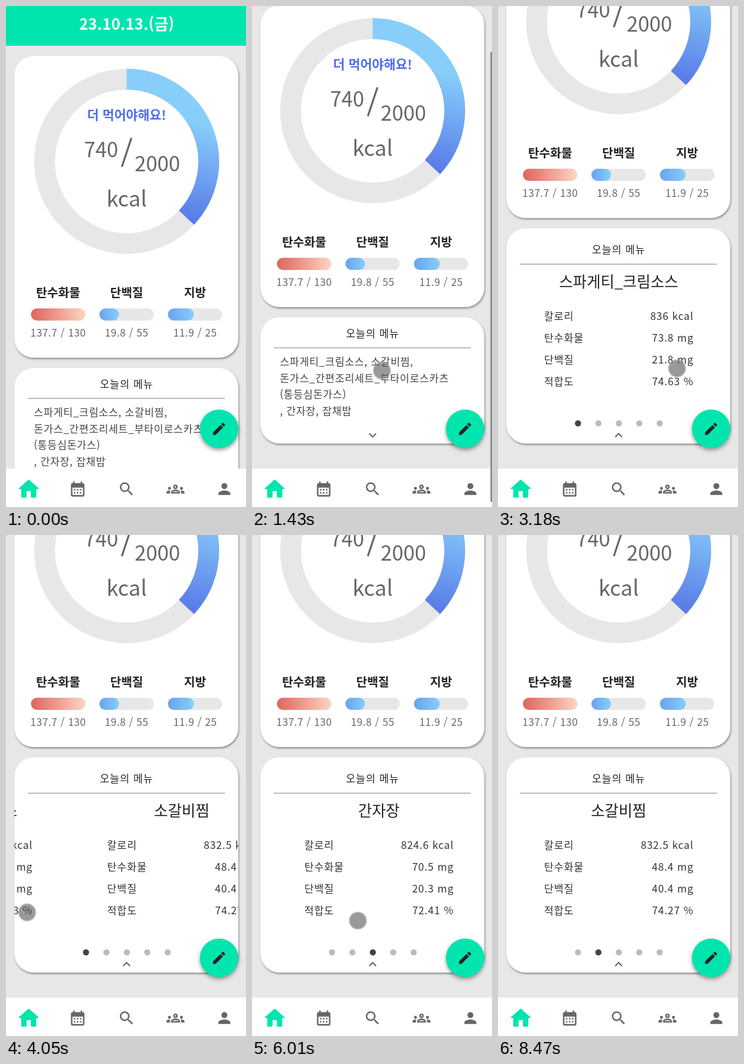
These frames come from a looping animation (375 by 782 pixels, 8.67 s). An HTML page:

```html
<!DOCTYPE html>
<html lang="ko">
<head>
<meta charset="utf-8">
<style>
html, body { margin: 0; width: 100%; height: 100%; overflow: hidden; background: #e7e7e7 }
svg { display: block; font: 300 16px "Noto Sans CJK KR", "Noto Sans CJK", sans-serif; fill: #333 }
.mid { text-anchor: middle }
.end { text-anchor: end }
.card { fill: #fff; filter: drop-shadow(1.5px 2px 1.5px #0006) }
.big { font-size: 32px; font-weight: 400; fill: #666 }
.name { font-size: 18.7px; font-weight: 600; fill: #222 }
.amount { fill: #666; letter-spacing: .45px }
.head { font-weight: 400; fill: #222; letter-spacing: .9px }
.list { fill: #444; letter-spacing: .6px }
.dish { font-size: 23.5px; fill: #222 }
.row { letter-spacing: .8px }
.icon { fill: #666 }
</style>
</head>
<body>
<svg id="stage" width="375" height="782" viewBox="0 0 375 782"></svg>
<script>
const LOOP = 8670, PITCH = 350, VIEW = 774;
const MINT = '#00e5ae';

const dishes = [
  [['스파게티_크림소스'], '836', '73.8', '21.8', '74.63'],
  [['소갈비찜'], '832.5', '48.4', '40.4', '74.27'],
  [['돈가스_간편조리세트_부타이로', '스카츠 (통등심돈가스)'], '835.8', '34.2', '46.1', '72.86'],
  [['간자장'], '824.6', '70.5', '20.3', '72.41'],
  [['잡채밥'], '818.2', '76.1', '18.7', '71.95']
];
const rowNames = ['칼로리', '탄수화물', '단백질', '적합도'];
const units = ['kcal', 'mg', 'mg', '%'];

const icons = {
  home: 'M10 19v-5h4v5c0 .55.45 1 1 1h3c.55 0 1-.45 1-1v-7h1.7c.46 0 .68-.57.33-.87L12.67 3.6c-.38-.34-.96-.34-1.34 0l-8.36 7.53c-.34.3-.13.87.33.87H5v7c0 .55.45 1 1 1h3c.55 0 1-.45 1-1z',
  calendar: 'M19 4h-1V2h-2v2H8V2H6v2H5c-1.1 0-2 .9-2 2v14c0 1.1.9 2 2 2h14c1.1 0 2-.9 2-2V6c0-1.1-.9-2-2-2zm0 16H5V10h14v10zM9 14H7v-2h2v2zm4 0h-2v-2h2v2zm4 0h-2v-2h2v2zm-8 4H7v-2h2v2zm4 0h-2v-2h2v2zm4 0h-2v-2h2v2z',
  search: 'M15.5 14h-.79l-.28-.27A6.5 6.5 0 1 0 13.73 14.43l.27.28v.79l5 4.99L20.49 19l-4.99-5zm-6 0a4.5 4.5 0 1 1 0-9 4.5 4.5 0 0 1 0 9z',
  groups: 'M4 13a2 2 0 1 0 0-4 2 2 0 0 0 0 4zm1.13 1.1a7 7 0 0 0-3.91.48A2 2 0 0 0 0 16.43V18h4.5v-1.61c0-.83.23-1.61.63-2.29zM20 13a2 2 0 1 0 0-4 2 2 0 0 0 0 4zm4 3.43a2 2 0 0 0-1.22-1.85 7 7 0 0 0-3.91-.48c.4.68.63 1.46.63 2.29V18H24zm-7.76-2.78a10.400 10.400 0 0 0-8.480 0A3 3 0 0 0 6 16.390V18h12v-1.610a3 3 0 0 0-1.760-2.740zM8.070 16c.09-.23.13-.39.91-.69a8.300 8.300 0 0 1 6.040 0c.77.3.81.46.91.69zM12 8a1 1 0 1 1 0 2 1 1 0 0 1 0-2m0-2a3 3 0 1 0 0 6 3 3 0 0 0 0-6z',
  person: 'M12 12a4 4 0 1 0 0-8 4 4 0 0 0 0 8zm0 2c-2.67 0-8 1.340-8 4v2h16v-2c0-2.660-5.330-4-8-4z',
  pencil: 'M3 17.25V21h3.75L17.81 9.94l-3.75-3.75L3 17.25zM20.710 7.040a1 1 0 0 0 0-1.410l-2.340-2.340a1 1 0 0 0-1.410 0l-1.830 1.830 3.750 3.750 1.830-1.830z',
  chevron: 'M16.59 8.59L12 13.17 7.41 8.59 6 10l6 6 6-6z'
};

const text = (x, y, cls, s) => `<text x="${x}" y="${y}" class="${cls}">${s}</text>`;
const icon = (name, x, y, scale, fill = '#666', flip = 1) =>
  `<path d="${icons[name]}" fill="${fill}" transform="translate(${x} ${y}) scale(${scale} ${scale * flip}) translate(-12 -12)"/>`;
const gradient = (id, from, to, attrs = '') =>
  `<linearGradient id="${id}" ${attrs}><stop stop-color="${from}"/><stop offset="1" stop-color="${to}"/></linearGradient>`;

function ring() {
  const r = 128.25, cx = 188.5, cy = 242.5, a = 740 / 2000 * 2 * Math.PI;
  return `<g fill="none" stroke-width="32.5">
    <circle cx="${cx}" cy="${cy}" r="${r}" stroke="#e7e7e7"/>
    <path d="M${cx} ${cy - r}A${r} ${r} 0 0 1 ${cx + r * Math.sin(a)} ${cy - r * Math.cos(a)}" stroke="url(#arc)"/></g>`;
}

function nutrient(x, name, amount, goal, fill) {
  const w = 85 * Math.min(1, amount / goal), mid = x + 42.5;
  const bar = (width, color) => `<rect x="${x}" y="472" width="${width}" height="19" rx="9.5" fill="${color}"/>`;
  return text(mid, 454, 'name mid', name) + bar(85, '#e7e7e7') + bar(w, `url(#${fill})`) +
    text(mid, 516, 'amount mid', `${amount} / ${goal}`);
}

const rule = y => `<path d="M34 ${y}H342" stroke="#aaa" stroke-width="1.5"/>`;

function slide([title, ...values]) {
  const top = 143 + 36 * (title.length - 1);
  return '<g class="slide">' +
    title.map((line, i) => text(188.5, 91.5 + 36 * i, 'dish mid', line)).join('') +
    values.map((v, i) => text(72, top + 34 * i, 'row', rowNames[i]) +
      text(305.5, top + 34 * i, 'row end', `${v} ${units[i]}`)).join('') + '</g>';
}

const stage = document.getElementById('stage');
stage.innerHTML = `
<defs>
  ${gradient('arc', '#87cefa', '#597be8', 'gradientUnits="userSpaceOnUse" x1="330" y1="190" x2="290" y2="335"')}
  ${gradient('red', '#e0645c', '#fcd5c4')}
  ${gradient('blue', '#6aa3ee', '#87cefa')}
  <clipPath id="frame"><rect x="13" width="350" height="336"/></clipPath>
</defs>
<rect width="375" height="782" fill="#e7e7e7"/>
<g id="page">
  <rect width="375" height="62" fill="${MINT}"/>
  <text x="188.5" y="37" class="mid" font-size="24" font-weight="700" fill="#fff">23.10.13.(금)</text>
  <rect class="card" x="13" y="78" width="350" height="471" rx="30"/>
  ${ring()}
  <text x="188.5" y="178" class="mid" font-size="20" font-weight="600" fill="#4d6bf2">더 먹어야해요!</text>
  ${text(122, 236, 'big', '740')}
  <path d="M196 206L181 251" stroke="#666" stroke-width="3"/>
  ${text(201, 257.5, 'big', '2000')}
  <text x="188.5" y="313" class="big mid" style="font-size:33.5px">kcal</text>
  ${nutrient(39, '탄수화물', 137.7, 130, 'red')}
  ${nutrient(146, '단백질', 19.8, 55, 'blue')}
  ${nutrient(253, '지방', 11.9, 25, 'blue')}
  <g transform="translate(0 565)">
    <rect id="menu" class="card" x="13" width="350" rx="30"/>
    <g id="closed">
      ${text(188.5, 31, 'head mid', '오늘의 메뉴')}${rule(47.5)}
      ${['스파게티_크림소스, 소갈비찜,', '돈가스_간편조리세트_부타이로스카츠', '(통등심돈가스)', ', 간자장, 잡채밥']
        .map((s, i) => text(43.5, 75 + 25.5 * i, 'list', s)).join('')}
      ${icon('chevron', 188.5, 184, 1)}
    </g>
    <g id="open">
      ${text(188.5, 39, 'head mid', '오늘의 메뉴')}${rule(56)}
      <g clip-path="url(#frame)">${[...dishes, dishes[0]].map(slide).join('')}</g>
      ${dishes.map((_, i) => `<circle class="dot" cx="${125 + 31.9 * i}" cy="304.5" r="4.8"/>`).join('')}
      ${icon('chevron', 188.5, 323, 1, '#666', -1)}
    </g>
  </g>
</g>
<circle cx="333" cy="660" r="30" fill="${MINT}" style="filter:drop-shadow(0 3px 3px #0006)"/>
${icon('pencil', 333, 660, 1.05, '#222')}
<rect y="722" width="375" height="60" fill="#fff"/>
${icon('home', 35.500, 754, 1.68, MINT)}
${['calendar', 'search', 'groups', 'person'].map((n, i) => icon(n, 112 + 76.4 * i, 754, 1.17)).join('')}
<rect id="bar" x="372.5" width="2.5" fill="#888"/>
<circle id="touch" r="12.5" fill="#555" fill-opacity=".6" stroke="#999" stroke-opacity=".65" stroke-width="3"/>`;

const $ = id => document.getElementById(id);
const slides = stage.querySelectorAll('.slide'), dots = stage.querySelectorAll('.dot');

// Each key is [time, value, ...]; values ease between neighbours.
const scrollKeys = [[860, 0], [1380, 79], [2430, 79], [2640, 104], [2980, 218]];
const pageKeys = [[3540, 0], [4050, .754], [4110, .77], [4350, 1], [4560, 1], [4850, 1.74], [5060, 2],
  [5620, 2], [5850, 2.72], [6050, 3], [6180, 3], [6370, 3.72], [6500, 4], [6600, 4], [6850, 4.926], [6940, 5]];
const barKeys = [[860, 0], [930, 1], [1500, 1], [1700, 0], [2430, 0], [2500, 1], [3050, 1], [3180, 0]];
const touchKeys = [[600, 390, 690], [860, 208, 660], [1380, 203, 570], [1430, 203, 569], [1720, 189, 669],
  [1950, 189, 669], [2300, 243, 560], [2430, 245, 545], [2640, 246, 518], [2980, 245, 404],
  [3240, 285, 590], [3540, 300, 600], [4050, 33, 589], [4130, 28, 590], [4560, 300, 604], [4850, 40, 600],
  [5280, 255, 604], [5410, 296, 604], [5610, 296, 604], [5850, 44, 600], [6180, 296, 604], [6370, 44, 600],
  [6600, 296, 604], [6830, -20, 600], [7030, -20, 600], [7390, 238, 605], [8010, 334, 800]];

function at(keys, t) {
  const n = keys.findIndex(k => k[0] > t);
  if (n < 1) return keys.at(n).slice(1);
  const a = keys[n - 1], b = keys[n], u = (t - a[0]) / (b[0] - a[0]), e = u * u * (3 - 2 * u);
  return a.slice(1).map((v, i) => v + (b[i + 1] - v) * e);
}

function draw(t) {
  const open = t >= 1850;
  const [scroll] = at(scrollKeys, t), [x, y] = at(touchKeys, t);
  const page = t >= 8470 ? 1 : at(pageKeys, t)[0];

  $('page').setAttribute('transform', `translate(0 ${-scroll})`);
  $('menu').setAttribute('height', open ? 336 : 197);
  $('closed').style.display = open ? 'none' : '';
  $('open').style.display = open ? '' : 'none';
  slides.forEach((s, i) => s.setAttribute('transform', `translate(${(i - page) * PITCH} 0)`));
  dots.forEach((d, i) => d.setAttribute('fill', i === Math.floor(page) % 5 ? '#444' : '#bbb'));

  const ratio = VIEW / (VIEW + (open ? 218 : 79));
  $('bar').setAttribute('y', scroll * ratio);
  $('bar').setAttribute('height', VIEW * ratio);
  $('bar').setAttribute('opacity', at(barKeys, t)[0]);
  $('touch').setAttribute('transform', `translate(${x} ${y})`);
}

const start = performance.now();
function tick() {
  draw((performance.now() - start) % LOOP);
  requestAnimationFrame(tick);
}
tick();
</script>
</body>
</html>
```
